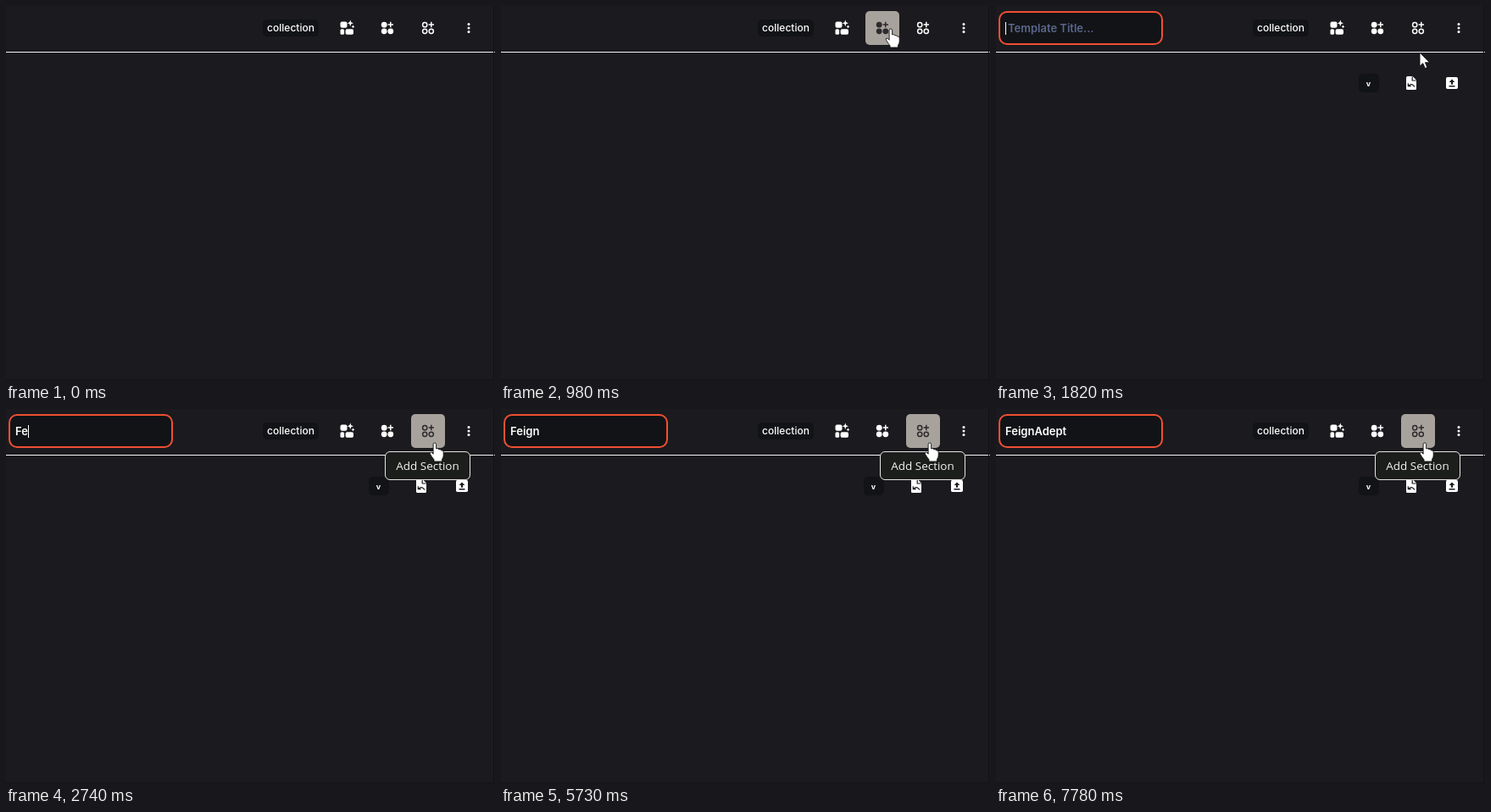
An HTML page that plays this animation: 577 by 443 pixels, repeating every 8 s.

```html
<!DOCTYPE html>
<html lang="en">
<head>
<meta charset="utf-8">
<title>Template editor</title>
<style>
  html, body { margin: 0; width: 100%; height: 100%; overflow: hidden; background: #1b1a1e; }
  svg { position: absolute; left: 0; top: 0; display: block; }
  .pill { fill: #121316; }
  .btn { color: #fff; }
  .btn .bg { fill: none; }
  .btn.hover { color: #2d2b2e; }
  .btn.hover .bg { fill: #a8a29c; }
  .line { fill: none; stroke: currentColor; stroke-width: 1.5; }
  .label { font: 500 12px Inter, sans-serif; fill: #fff; text-anchor: middle; }
  .tip { font: 13.5px "Open Sans", sans-serif; fill: #f5f5f4; text-anchor: middle; }
  #field {
    position: absolute; left: 3px; top: 6px; width: 194px; height: 40px; box-sizing: border-box;
    border: 2px solid #f05033; border-radius: 10px; background: #121316;
    font: 600 13px/15px Inter, sans-serif; color: #fff; white-space: pre;
  }
  #field div { position: absolute; left: 6px; top: 11px; height: 15px; }
  #field #hint { left: 9px; color: #5b678c; }
  #caret { display: inline-block; width: 1px; height: 15px; margin-right: -1px; background: #fff; vertical-align: top; }
</style>
</head>
<body>
<svg width="577" height="443" viewBox="0 0 577 443">
  <rect width="577" height="443" fill="#1b1a1e"/>
  <path d="M0 54.5H577" stroke="#f4f4f4"/>
  <path d="M575.5 0V443" stroke="#111114"/>
  <path d="M0 442H577" stroke="#161619" stroke-width="2"/>

  <rect class="pill" x="303" y="16" width="66" height="20" rx="5"/>
  <text class="label" x="336" y="30">collection</text>

  <g fill="#fff">
    <rect x="394.5" y="18.5" width="8" height="7.3" rx="2"/>
    <rect x="394.5" y="27.2" width="4.6" height="6.6" rx="1.6"/>
    <rect x="400.6" y="27.2" width="9.4" height="6.6" rx="1.8"/>
    <path d="M406.3 16.6L407.3 19.3L410 20.3L407.3 21.3L406.3 24L405.3 21.3L402.6 20.3L405.3 19.3Z"/>
    <path d="M409.5 22.3L410.1 23.8L411.6 24.4L410.1 25L409.5 26.5L408.9 25L407.4 24.4L408.9 23.8Z"/>
    <circle cx="546" cy="21.5" r="1.5"/>
    <circle cx="546" cy="26" r="1.5"/>
    <circle cx="546" cy="30.5" r="1.5"/>
  </g>

  <g class="btn" id="add" transform="translate(430 6)">
    <rect class="bg" width="40" height="40" rx="5"/>
    <g fill="currentColor">
      <circle cx="16.2" cy="16.2" r="3.4"/>
      <circle cx="16.2" cy="23.8" r="3.4"/>
      <circle cx="23.8" cy="23.8" r="3.4"/>
    </g>
    <path class="line" d="M20.6 16H27M23.8 12.8V19.2"/>
  </g>

  <g class="btn" id="section" transform="translate(478 6)">
    <rect class="bg" width="40" height="40" rx="5"/>
    <g class="line">
      <circle cx="16.2" cy="16.2" r="2.6"/>
      <circle cx="16.2" cy="23.8" r="2.6"/>
      <circle cx="23.8" cy="23.8" r="2.6"/>
      <path d="M20.6 16H27M23.8 12.8V19.2"/>
    </g>
  </g>

  <g id="tools">
    <rect class="pill" x="428" y="80" width="24" height="22" rx="5"/>
    <text class="label" x="439.5" y="95" style="font-size:9px;font-weight:700">v</text>
    <path fill="#fff" d="M485.5 83H491.5L496 87.5V97.5Q496 99 494.5 99H485.5Q484 99 484 97.5V84.5Q484 83 485.5 83Z"/>
    <path fill="none" stroke="#1b1a1e" stroke-width="1.2" d="M491.2 83.5V88H495.6M486.3 91.2V94.6H489.6M486.6 94.3Q490.5 90.4 494 95.4"/>
    <rect x="531" y="84" width="14" height="14" rx="1.8" fill="#fff"/>
    <path fill="#1b1a1e" d="M538 86.4L541.3 89.9H539.1V92.8H536.9V89.9H534.7ZM534.5 94H541.5V95.4H534.5Z"/>
  </g>

  <g id="tooltip">
    <rect x="447.5" y="50.5" width="100" height="33" rx="5.5" fill="#1c1e1c" stroke="#e7e5e4"/>
    <text class="tip" x="497.5" y="72">Add Section</text>
  </g>

  <g id="cursor" stroke="#111" stroke-width=".9" stroke-linejoin="round" fill="#fff">
    <path id="arrow" d="M0 0V16.2L3.7 12.7L6.3 18.6L8.9 17.5L6.4 11.8H11.6Z"/>
    <path id="hand" d="M-1.9 1.7Q-1.9 0 -.2 0Q1.6 0 1.6 1.7V6.8Q4.2 6 4.6 7.8Q7 7 7.4 8.9Q10.2 8.3 10.2 10.8V15Q10.2 17.4 8.6 19.2V22H-1V19.8Q-3.2 17.2 -5.4 13.4Q-6.4 11.4 -5 11Q-3.6 10.7 -1.9 13.2Z"/>
  </g>
</svg>
<div id="field"><div id="hint">Template Title...</div><div><span id="text"></span><span id="caret"></span></div></div>

<script>
const LOOP = 8000, STEP = 70;
const $ = id => document.getElementById(id);

// time, x, y of the pointer's hot spot
const path = [
  [70, 544, 432], [210, 490, 322], [350, 425, 186], [490, 394, 104], [560, 405, 80],
  [700, 440, 54], [770, 456, 43], [840, 463, 32], [980, 460, 27], [1050, 458, 23],
  [1610, 458, 23], [1680, 464, 43], [1750, 484, 70], [1820, 500, 55], [1890, 506, 40]
];

const typed = [
  [0, ""], [2530, "F"], [2740, "Fe"], [2950, "Fei"], [3090, "Feig"], [3450, "Feign"],
  [5160, "Feign "], [5940, "FeignA"], [6720, "FeignAd"], [6930, "FeignAde"],
  [7070, "FeignAdep"], [7210, "FeignAdept"]
];

const caretOff = [[1890, 2460], [4020, 4520], [5020, 5160], [5730, 5940], [6440, 6720], [7780, 8000]];

function pointAt(t) {
  const i = path.findIndex(p => p[0] > t);
  if (i < 0) return path[path.length - 1].slice(1);
  if (i === 0) return path[0].slice(1);
  const [t0, x0, y0] = path[i - 1], [t1, x1, y1] = path[i];
  const k = (t - t0) / (t1 - t0);
  return [Math.round(x0 + (x1 - x0) * k), Math.round(y0 + (y1 - y0) * k)];
}

const inside = (x, y, left) => x >= left && x < left + 40 && y >= 6 && y < 46;
const show = (id, on) => { $(id).style.visibility = on ? "visible" : "hidden"; };

function draw(t) {
  const tick = Math.floor(t / STEP) * STEP;
  const [x, y] = pointAt(tick);
  const onAdd = inside(x, y, 430), onSection = inside(x, y, 478);
  $("add").classList.toggle("hover", t >= 70 && onAdd);
  $("section").classList.toggle("hover", t >= 70 && onSection);
  $("cursor").setAttribute("transform", `translate(${x} ${y})`);
  show("cursor", t >= 70);
  show("hand", t >= 70 && (onAdd || onSection));
  show("arrow", t >= 70 && !onAdd && !onSection);
  show("tooltip", t >= 1890);

  const fade = Math.min(1, Math.max(0, (tick - 1190) / 210));
  $("field").style.opacity = $("tools").style.opacity = fade;

  const text = typed.filter(s => s[0] <= t).pop()[1];
  if ($("text").textContent !== text) $("text").textContent = text;
  show("hint", !text);
  show("caret", !caretOff.some(([a, b]) => t >= a && t < b));
}

let start;
function frame(now) {
  start ??= now;
  draw((now - start) % LOOP);
  requestAnimationFrame(frame);
}
draw(0);
requestAnimationFrame(frame);
</script>
</body>
</html>
```
